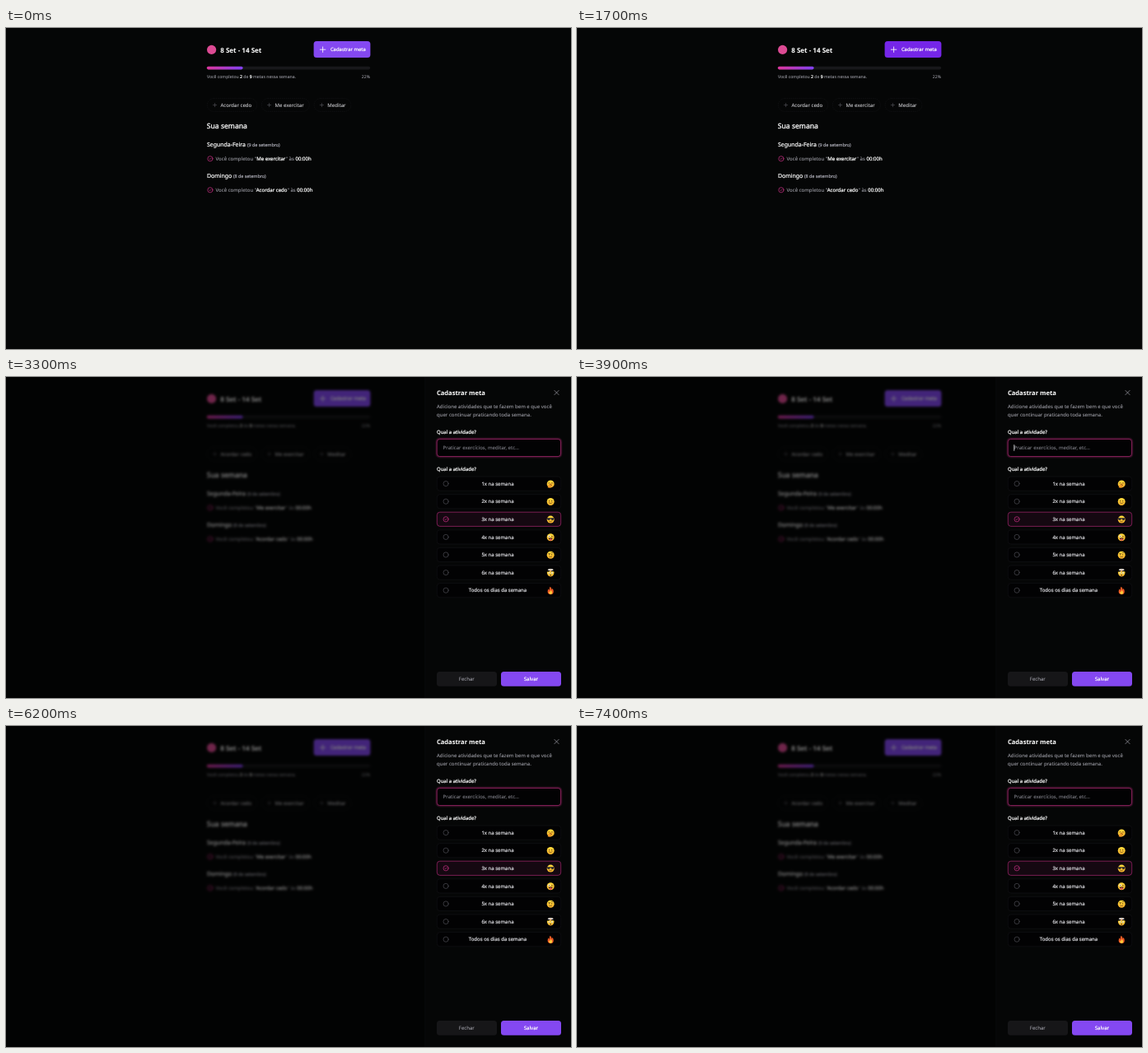
These frames come from a looping animation (686x390 px, 8 s). An HTML page:

```html
<!DOCTYPE html>
<html lang="pt-BR">
<head>
<meta charset="utf-8">
<title>Metas da semana</title>
<style>
  html, body { margin: 0; width: 100%; height: 100%; overflow: hidden; background: #050606; }
  svg { display: block; width: 686px; height: 390px; }
  text {
    font-family: "Noto Sans", "Open Sans", sans-serif;
    font-size: 6.05px;
    fill: currentColor;
    stroke: currentColor;
    stroke-width: .05px;
    text-rendering: geometricPrecision;
    white-space: pre;
  }
  .bold { font-weight: 700; }
  .medium { stroke: currentColor; stroke-width: .22px; }
  .mid { text-anchor: middle; }
  .end { text-anchor: end; }
  .white { color: #fafafa; }
  .light { color: #d4d4d8; }
  .grey { color: #a1a1aa; }
  .xs { font-size: 5.15px; }
  .date { font-size: 5.4px; }
  .heading { font-size: 8.6px; stroke-width: .3px; }
  .line { fill: none; stroke: currentColor; stroke-linecap: round; stroke-linejoin: round; }
  .pink { color: #d9348f; }
  .dim { color: #5a5a62; }

  #page { animation: dim 8s step-end infinite; }
  #add { fill: #8448f1; animation: hover 8s step-end infinite; }
  #panel { animation: open 8s step-end infinite; }
  #caret { animation: blink 8s step-end infinite; }

  @keyframes hover { 0%, 33.75%, 100% { fill: #8448f1; } 21.25% { fill: #7526e8; } }
  @keyframes dim {
    0% { filter: none; }
    33.75%, 100% { filter: blur(1.7px) brightness(.5); }
  }
  @keyframes open { 0% { opacity: 0; } 33.75%, 100% { opacity: 1; } }
  @keyframes blink {
    0%, 41.25%, 63.75%, 77.5%, 92.5%, 100% { opacity: 0; }
    33.75%, 48.75%, 71.25%, 86.25% { opacity: 1; }
  }
</style>
</head>
<body>
<svg viewBox="0 0 686 390">
  <defs>
    <linearGradient id="bar"><stop stop-color="#dc369b"/><stop offset="1" stop-color="#8040f2"/></linearGradient>
    <linearGradient id="skin" x2="0" y2="1"><stop stop-color="#ffdc3c"/><stop offset="1" stop-color="#f8b02c"/></linearGradient>
    <g id="plus"><path class="line" d="M-2.1 0H2.1M0-2.1V2.1"/></g>
    <g id="check" class="line" stroke-width=".65">
      <circle r="3.1"/><path d="M-1.1 .1-.3 .8 1.2-.7"/>
    </g>
    <circle id="face" r="4.5" fill="url(#skin)"/>
  </defs>

  <g id="page">
    <rect width="686" height="390" fill="#050606"/>
    <circle cx="249.6" cy="26.4" r="5.6" fill="#dc4a93"/>
    <text class="bold white" x="260.2" y="29.5" style="font-size:8.05px">8 Set - 14 Set</text>

    <rect id="add" x="373.6" y="15.9" width="68.8" height="20.2" rx="3.5"/>
    <use class="white" href="#plus" transform="translate(384.6 26.2) scale(1.55)" stroke-width=".55"/>
    <text class="medium white" x="393.9" y="28.2" style="font-size:5.92px">Cadastrar meta</text>

    <rect x="243.8" y="46.8" width="198.4" height="3.6" rx="1.8" fill="#18181b"/>
    <rect x="243.8" y="46.8" width="43.8" height="3.6" rx="1.8" fill="url(#bar)"/>
    <text class="xs grey" x="244" y="61">Você completou <tspan class="medium white">2</tspan> de <tspan class="medium white">9</tspan> metas nessa semana.</text>
    <text class="xs grey end" x="442" y="61">22%</text>

    <g id="pills"></g>
    <text class="heading white" x="243.8" y="122.2">Sua semana</text>
    <g id="days"></g>
  </g>

  <g id="panel">
    <rect x="508.8" width="178" height="390" fill="#050606"/>
    <path d="M508.8 0V390" stroke="#101012" stroke-width=".6"/>
    <text class="bold white" x="522.9" y="21.7" style="font-size:7.6px">Cadastrar meta</text>
    <path class="line grey" stroke-width=".7" d="M665.9 16.4l5.2 5.2m0-5.2l-5.2 5.2"/>
    <text class="grey" x="523" y="37.6">Adicione atividades que te fazem bem e que você</text>
    <text class="grey" x="523" y="47.9">quer continuar praticando toda semana.</text>

    <text class="medium white" x="523" y="68.7" style="font-size:5.98px">Qual a atividade?</text>
    <rect x="522.4" y="74.6" width="152" height="22.8" rx="4" fill="none" stroke="#d9348f" stroke-opacity=".16" stroke-width="2"/>
    <rect x="523.2" y="75.4" width="150.4" height="21.2" rx="3.5" fill="#020203" stroke="#c02d80" stroke-width=".7"/>
    <text x="530.6" y="88" color="#85858d">Praticar exercícios, meditar, etc...</text>
    <rect id="caret" x="530.4" y="82.2" width=".8" height="7.6" fill="#e4e4e7"/>

    <text class="medium white" x="523" y="114.2" style="font-size:5.98px">Qual a atividade?</text>
    <g id="options"></g>

    <rect x="523" y="358" width="73" height="17.7" rx="3.5" fill="#161618"/>
    <text class="grey mid" x="559.3" y="368.7">Fechar</text>
    <rect x="601" y="358" width="73" height="17.7" rx="3.5" fill="#8448f1"/>
    <text class="medium white mid" x="637.4" y="368.7">Salvar</text>
  </g>
</svg>
<script>
  const fill = (id, items, draw) =>
    document.getElementById(id).innerHTML = items.map(draw).join("");

  const pills = [["Acordar cedo", 244, 61], ["Me exercitar", 310, 58.6], ["Meditar", 373.8, 45.4]];
  fill("pills", pills, ([name, x, w]) => `
    <rect x="${x + .3}" y="85.6" width="${w - .6}" height="15.8" rx="7.9" fill="none"
      stroke="#1b1b1f" stroke-width=".5" stroke-dasharray="1.4 1"/>
    <use class="dim" href="#plus" x="${x + 9.6}" y="93.6" stroke-width=".6"/>
    <text class="light" x="${x + 16.5}" y="95.8">${name}</text>`);

  const days = [
    ["Segunda-Feira", "9 de setembro", "Me exercitar", 144.4, 292.9],
    ["Domingo", "8 de setembro", "Acordar cedo", 182.4, 275.9],
  ];
  fill("days", days, ([day, date, goal, y, dateX]) => `
    <text class="medium white" x="243.9" y="${y}" style="font-size:6.98px">${day}</text>
    <text class="date medium grey" x="${dateX}" y="${y}">(${date})</text>
    <use class="pink" href="#check" x="247.9" y="${y + 14.4}"/>
    <text class="grey" x="254.6" y="${y + 16.6}">Você completou "<tspan
      class="medium white">${goal}</tspan>" às <tspan class="medium white">00:00h</tspan></text>`);

  const dark = "#4a2f16";
  const eye = (x, y = -.9, r = .65) => `<circle cx="${x}" cy="${y}" r="${r}" fill="${dark}"/>`;
  const stroke = d => `<path d="${d}" class="line" color="${dark}" stroke-width=".6"/>`;
  const face = parts => `<use href="#face"/>${parts}`;
  const emojis = [
    face(stroke("M-2.7-1q.8-.8 1.7 0M1-1q.8-.8 1.7 0") +
      `<ellipse cy="1.4" rx="1.4" ry="1.6" fill="${dark}"/>
       <path d="M-3.5 4.4Q-3.6 1.6-1.5.8L1.7.2Q2.6.6 1.8 1.3L.4 1.9Q1.2 4.3-1 4.9Z" fill="#f39a25"/>`),
    face(eye(-1.5) + eye(1.5) + stroke("M-2 1.3Q0 3.2 2 1.3")),
    face(`<path d="M-4.4-1.9H4.4L3.9.1Q2.2 1.5.8.2L.3-.8H-.3L-.8.2Q-2.2 1.5-3.9.1Z" fill="#24262b"/>` +
      stroke("M-1.7 2.2Q.2 3.3 1.9 1.9")),
    face(`<circle cx="-1.6" cy="-1.2" r="1.3" fill="#fff"/>` + eye(-1.6, -1.2, .6) +
      stroke("M1-1q.9-.8 1.8 0") +
      `<path d="M-2.6.9H2.6Q2 3.4 0 3.4T-2.6.9Z" fill="${dark}"/>
       <path d="M-1 1.8H1.2V3.6Q.1 4.7-1 3.6Z" fill="#ef4a64"/>`),
    face(eye(-1.5, -.5) + eye(1.5, -.5) + stroke("M-2.6-1.7H-.7M.7-2.7q1-.8 2 .1M-1.5 2.1H1.5")),
    `<path d="M-4.4-1.2Q-4.2 4.5 0 4.5T4.4-1.2L2.6-2 1-1.3-.8-2-2.4-1.3Z" fill="url(#skin)"/>
     <path d="M-1.6-1.6-1-3Q-3.6-2.6-3.5-3.7-2.8-5 0-4.8 2.9-5 3.5-3.7 3.6-2.6 1-3L1.6-1.6Z" fill="#d9d4cf"/>
     <path d="M-.6-1.5-.4-3.6H.4L.6-1.5Z" fill="#f08a2a"/>
     <circle cx="-1.7" cy=".4" r="1" fill="#fff"/><circle cx="1.7" cy=".4" r="1" fill="#fff"/>` +
      eye(-1.7, .4, .45) + eye(1.7, .4, .45) + `<ellipse cy="2.8" rx=".9" ry=".8" fill="${dark}"/>`,
    `<path d="M-.6-4.8Q1.4-3.4 1.4-1.2 2.2-1.6 2.1-2.8 3.9-.9 3.6 1.4 3.1 4.6 0 4.7-3.4 4.5-3.6 1.3-3.6-.8-2.2-2.2-2.2-1-1.4-.6-1.6-3.2-.6-4.8Z" fill="#ee5a24"/>
     <path d="M.1-.6Q2.3 1 2 2.7 1.6 4.4 0 4.5-1.9 4.3-2 2.5-1.9 1.3-1 .7-.8 1.5-.2 1.6-.4.4.1-.6Z" fill="#ffc93a"/>`,
  ];

  fill("options", emojis, (emoji, i) => {
    const y = 129.6 + i * 21.6;
    const on = i === 2;
    const name = i < 6 ? `${i + 1}x na semana` : "Todos os dias da semana";
    const radio = on
      ? `<use class="pink" href="#check" x="534.1" y="${y}"/>`
      : `<circle class="line dim" cx="534.1" cy="${y}" r="3.1" stroke-width=".6"/>`;
    return `
      <rect x="523.3" y="${y - 8.6}" width="150.4" height="17.2" rx="3.5" stroke-width=".65"
        fill="${on ? "#150811" : "#020203"}" stroke="${on ? "#b32b79" : "#141417"}"/>
      ${radio}
      <text class="medium light mid" x="597" y="${y + 2.1}" style="font-size:6px">${name}</text>
      <g transform="translate(661.2 ${y + .3})">${emoji}</g>`;
  });
</script>
</body>
</html>
```
